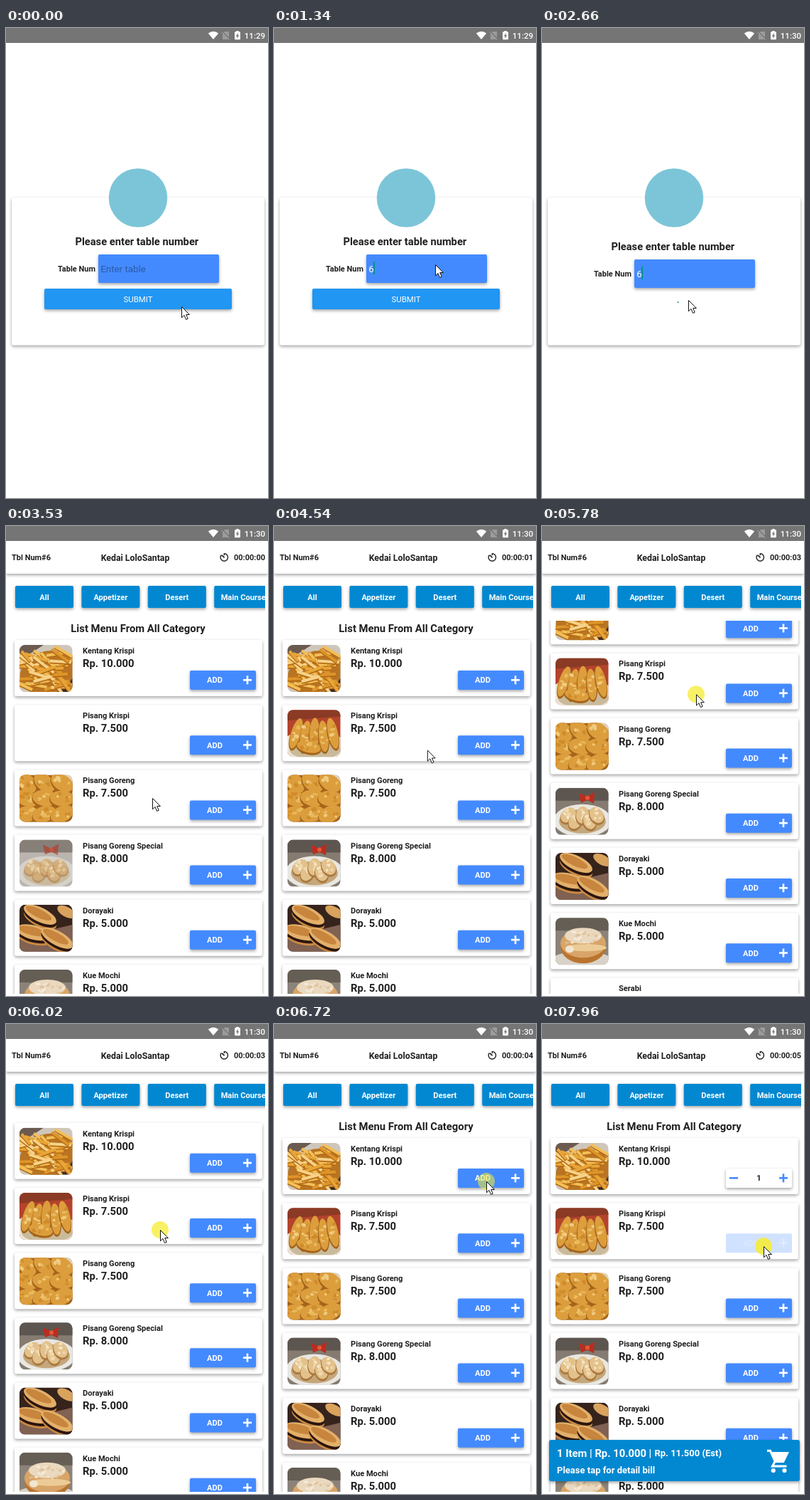
Recreate the animation shown at these times as an HTML page with a canvas. Size 369 px wide and 660 px high, loop 8000 ms.

```html
<!DOCTYPE html>
<html lang="id">
<head>
<meta charset="utf-8">
<title>Table order</title>
<style>
  html, body { margin: 0; width: 100%; height: 100%; overflow: hidden; background: #fff; }
  canvas { display: block; width: 369px; height: 660px; }
</style>
</head>
<body>
<canvas id="stage"></canvas>
<script>
const W = 369, H = 660, LOOP = 8000;
const INK = '#1f1f1f', BLUE = '#448aff', DEEP = '#0288d1', TEAL = '#009688';
const canvas = document.getElementById('stage');
const c = canvas.getContext('2d');
const dpr = window.devicePixelRatio || 1;
canvas.width = W * dpr;
canvas.height = H * dpr;

const clamp = v => Math.max(0, Math.min(1, v));
const ramp = (t, from, span) => clamp((t - from) / span);
const ease = p => p * p * (3 - 2 * p);

// Interpolates rows of [time, ...values].
function follow(keys, t) {
  let i = 0;
  while (i < keys.length - 1 && t >= keys[i + 1][0]) i++;
  const a = keys[i], b = keys[Math.min(i + 1, keys.length - 1)];
  const p = a === b ? 0 : clamp((t - a[0]) / (b[0] - a[0]));
  return a.slice(1).map((v, k) => v + (b[k + 1] - v) * p);
}

const POINTER = [
  [0, 247, 391], [70, 247, 391], [250, 227, 332], [1570, 227, 332], [2040, 206, 382],
  [3990, 206, 382], [4610, 217, 306], [4780, 217, 306], [5330, 217, 253],
  [5600, 217, 224], [5640, 217, 224], [5780, 217, 236], [6080, 217, 302],
  [6420, 286, 234], [6570, 299, 221], [7100, 299, 221], [7640, 312, 312]
];
const SCROLL = [[4780, 0], [4860, 2], [5330, 35], [5580, 80], [5650, 82], [5780, 73], [6120, 0]];
const PRESSES = [
  [420, 570, .75], [2120, 2280, .75], [4780, 6090, .75], [6720, 6870, .55], [7960, 8000, .88]
];
const TICKS = [3660, 4610, 5640, 6720, 7730];

const ITEMS = [
  ['Kentang Krispi', '10.000', 3210],
  ['Pisang Krispi', '7.500', 4000],
  ['Pisang Goreng', '7.500', 3260],
  ['Pisang Goreng Special', '8.000', 3420],
  ['Dorayaki', '5.000', 3210],
  ['Kue Mochi', '5.000', 3240],
  ['Serabi', '5.000', 9000]
];

function text(str, x, y, size, color = INK, align = 'left', weight = 700) {
  c.font = `${weight} ${size}px Roboto, sans-serif`;
  c.textAlign = align;
  c.fillStyle = color;
  c.fillText(str, x, y + size * .355);
}

function box(x, y, w, h, color, r = 0, shadow = false) {
  c.save();
  if (shadow) {
    c.shadowColor = 'rgba(0,0,0,.36)';
    c.shadowBlur = 4 * dpr;
    c.shadowOffsetY = 2 * dpr;
  }
  c.fillStyle = color;
  c.beginPath();
  c.roundRect(x, y, w, h, r);
  c.fill();
  c.restore();
}

function oval(x, y, rx, ry, color, turn = 0) {
  c.fillStyle = color;
  c.beginPath();
  c.ellipse(x, y, rx, ry, turn, 0, Math.PI * 2);
  c.fill();
}

function line(points, color, width) {
  c.strokeStyle = color;
  c.lineWidth = width;
  c.beginPath();
  points.forEach(([x, y]) => c.lineTo(x, y));
  c.stroke();
}

function shape(points, color) {
  c.fillStyle = color;
  c.beginPath();
  points.forEach(([x, y]) => c.lineTo(x, y));
  c.closePath();
  c.fill();
}

// Food pictures, each 74.5 by 66.
let seed = 1;
const rand = (lo = 0, hi = 1) =>
  lo + (hi - lo) * ((seed = seed * 16807 % 2147483647) / 2147483647);
const pick = list => list[Math.floor(rand() * list.length)];

function fritter(x, y, rx, ry, turn, tones) {
  oval(x, y + 2, rx, ry, tones[0], turn);
  oval(x, y, rx - 1, ry - 1, tones[1], turn);
  for (let i = 0; i < 8; i++) {
    oval(x + rand(-.55, .55) * rx, y + rand(-.6, .4) * ry, rand(1.5, 4), rand(1, 3), pick(tones.slice(1)), turn);
  }
}

const GOLD = ['#a4641a', '#dc9e3c', '#e9b95d', '#cf8b2c', '#f0cb80'];
const PHOTOS = [
  () => {
    box(0, 0, 75, 66, '#cfc6bb');
    shape([[0, 0], [34, 0], [0, 22]], '#6b5a50');
    shape([[48, 66], [75, 46], [75, 66]], '#3d2b26');
    oval(39, 39, 39, 30, '#b87422', -.3);
    for (let i = 0; i < 46; i++) {
      const x = rand(5, 68), y = rand(9, 60), a = rand(-.5, 1), n = rand(9, 19);
      const dx = Math.cos(a) * n, dy = Math.sin(a) * n;
      line([[x - dx, y - dy + 1.5], [x + dx, y + dy + 1.5]], '#b56c16', 4.5);
      line([[x - dx, y - dy], [x + dx, y + dy]], pick(['#e8a537', '#f2bf58', '#dd952a', '#f6d288']), 4);
    }
  },
  () => {
    box(0, 0, 75, 66, '#b5432c');
    shape([[0, 0], [75, 0], [75, 9], [0, 15]], '#8a3a25');
    oval(36, 52, 46, 24, '#ece4d5');
    oval(39, 56, 36, 14, '#c9ba9b');
    for (let i = 0; i < 5; i++) fritter(12 + i * 13, 33 + i % 2 * 4, 8, 23, .3 - i * .13, GOLD);
    fritter(30, 52, 18, 9, .2, GOLD);
  },
  () => {
    box(0, 0, 75, 66, '#a8651e');
    shape([[50, 0], [75, 0], [75, 16]], '#dfd3bd');
    for (let i = 0; i < 9; i++) fritter(10 + i % 3 * 25, 11 + Math.floor(i / 3) * 22, 18, 12, .9 - i * .17, GOLD);
  },
  () => {
    box(0, 0, 75, 66, '#857b70');
    box(0, 0, 75, 18, '#5d5650');
    oval(38, 46, 41, 23, '#e9e7e2');
    oval(38, 47, 33, 17, '#c4a77b');
    const cream = ['#ab7840', '#e3c18a', '#efd8ae', '#f5e8ce'];
    for (let i = 0; i < 5; i++) fritter(18 + i * 10, 38 + i % 2 * 8, 10, 13, .8 - i * .35, cream);
    shape([[33, 7], [44, 12], [55, 6], [54, 22], [45, 17], [36, 21]], '#b92d20');
    oval(45, 14, 3, 3, '#e25a36');
  },
  () => {
    box(0, 0, 75, 66, '#35231c');
    shape([[0, 46], [75, 28], [75, 66], [0, 66]], '#806152');
    [[29, 14, .45], [20, 39, .25], [53, 47, .5]].forEach(([x, y, a]) => {
      oval(x, y + 7, 25, 10, '#c98a43', a);
      oval(x, y + 4, 25, 10, '#2b1510', a);
      oval(x, y, 25, 10, '#e3b06a', a);
      oval(x - 2, y - 2, 20, 6, '#c7853d', a);
    });
    oval(66, 10, 14, 7, '#d9a35d', .5);
  },
  () => {
    box(0, 0, 75, 66, '#8b8379');
    box(0, 0, 75, 18, '#655e54');
    oval(37, 60, 43, 13, '#d8d2c8');
    oval(39, 40, 32, 24, '#b9742f');
    oval(39, 36, 32, 20, '#d9a467');
    oval(39, 25, 26, 11, '#ead9bf');
    oval(43, 42, 29, 5, '#eccb96');
    oval(20, 44, 6, 5, '#f0e5d1');
    for (let i = 0; i < 26; i++) oval(rand(15, 63), rand(17, 37), rand(.8, 3), rand(.6, 2), pick(['#f4eadb', '#dfc49d']));
  }
];

function photo(i, x, y, alpha) {
  if (!PHOTOS[i] || alpha <= 0) return;
  c.save();
  c.globalAlpha = alpha;
  c.translate(x, y);
  c.beginPath();
  c.roundRect(0, 0, 74.5, 66, 8);
  c.clip();
  seed = 97 + i * 131;
  PHOTOS[i]();
  c.restore();
}

function statusBar(t) {
  box(0, 0, W, 21, '#757575');
  c.fillStyle = '#fff';
  c.beginPath();
  c.moveTo(292, 16);
  c.lineTo(284.8, 7.4);
  c.quadraticCurveTo(292, 2.2, 299.2, 7.4);
  c.fill();
  shape([[308, 5], [314, 5], [314, 16], [305, 16], [305, 8]], '#9b9b9b');
  line([[304, 5], [315, 16]], '#757575', 2);
  line([[303.5, 5.5], [314.5, 16.5]], '#a8a8a8', 1);
  box(322, 5.3, 8, 11, '#fff', 1);
  box(324.3, 4, 3.4, 2, '#fff');
  shape([[326.8, 6.7], [323.8, 11.4], [325.6, 11.4], [325.2, 15], [328.3, 10.2], [326.5, 10.2]], '#757575');
  text(t < 1800 ? '11:29' : '11:30', 365, 11, 11.5, '#fff', 'right', 500);
}

function formPage(t) {
  const busy = t >= 2430, dy = busy ? 7 : 0;
  box(8, 238, 356, 207.5, '#fff', 3, true);
  oval(186, 238.5, 41.3, 41.3, '#7cc5d8');
  text('Please enter table number', 184.3, 299.5 + dy, 14.7, INK, 'center');
  text('Table Num', 126, 338 + dy, 11, INK, 'right');
  box(130, 318 + dy, 170, 40, BLUE, 2, true);

  const typed = t >= 1340;
  if (typed) text('6', 133.3, 338 + dy, 13.3, '#fff', 'left', 400);
  else text('Enter table', 133.3, 338, 13.3, '#2a5aa6', 'left', 400);
  if (typed || (t >= 490 && t < 1030)) box(typed ? 140 : 133, 328 + dy, 2, 18, TEAL);

  if (busy) {
    const a = -.75 + (t - 2660) / 420;
    c.strokeStyle = TEAL;
    c.lineWidth = 1.6;
    c.beginPath();
    c.arc(186, 389, 7, a, a + .28);
    c.stroke();
    return;
  }
  box(54, 366, 264, 29, '#2196f3', 2, true);
  if (t >= 2120) {
    c.save();
    c.beginPath();
    c.rect(54, 366, 264, 29);
    c.clip();
    const r = 160 * ease(ramp(t, 2100, 230));
    oval(206, 382, r, r, 'rgba(255,255,255,.18)');
    c.restore();
  }
  text('SUBMIT', 186, 381, 11.4, '#fff', 'center', 400);
}

function plus(x, y, color) {
  line([[x - 6, y], [x + 6, y]], color, 2.6);
  line([[x, y - 6], [x, y + 6]], color, 2.6);
}

function addButton(y, alpha) {
  c.save();
  c.globalAlpha = alpha;
  box(259, y, 93, 27, BLUE, 2, alpha === 1);
  text('ADD', 294, y + 13.5, 11.1, '#fff', 'center');
  plus(340, y + 13.3, '#fff');
  c.restore();
}

function stepper(y) {
  box(259, y, 93, 27, '#fff', 2, true);
  line([[264, y + 13.3], [276, y + 13.3]], BLUE, 2.6);
  text('1', 305.5, y + 13.5, 11.1, INK, 'center');
  plus(340, y + 13.3, BLUE);
}

function menuList(t) {
  const [scroll] = follow(SCROLL, t);
  c.save();
  c.beginPath();
  c.rect(0, 133, W, 524);
  c.clip();
  c.translate(0, -scroll);
  text('List Menu From All Category', 186, 144, 14.8, INK, 'center');
  ITEMS.forEach(([name, price, loadAt], i) => {
    const y = 160 + i * 91.2;
    box(12, y, 349, 79, '#fff', 3, true);
    photo(i, 19, y + 7, ramp(t, loadAt, 200));
    text(name, 108, y + 15, 11.1);
    text('Rp. ' + price, 108, y + 32.7, 14.8);
    if (i === 0 && t >= 7100) stepper(y + 43);
    else {
      const faded = (i === 0 && t >= 6790) || (i === 1 && t >= 7950);
      addButton(y + 43, faded ? .25 : 1);
    }
  });
  c.restore();
}

function header(t) {
  box(0, 21, W, 46, '#fff', 2, true);
  box(0, 0, W, 21, '#757575');
  text('Tbl Num#6', 8, 44.5, 11);
  text('Kedai LoloSantap', 182, 44.5, 12.3, INK, 'center');
  c.strokeStyle = INK;
  c.lineWidth = 1.4;
  c.beginPath();
  c.arc(307.3, 44, 5.2, -Math.PI / 2, Math.PI * 1.22);
  c.stroke();
  line([[307.3, 38.3], [307.3, 41.2]], INK, 1.4);
  line([[303.8, 40.8], [307.6, 44.4]], INK, 1.6);
  const secs = TICKS.filter(k => t >= k).length;
  text('00:00:0' + secs, 365, 44.5, 11, INK, 'right');

  c.save();
  c.beginPath();
  c.rect(0, 76, 365, 50);
  c.clip();
  ['All', 'Appetizer', 'Desert', 'Main Course'].forEach((label, i) => {
    const x = 13 + i * 93.4;
    box(x, 84, 82, 31, DEEP, 2, true);
    text(label, x + 41, 100, 11.1, '#fff', 'center');
  });
  c.restore();
}

function billBar(t) {
  const p = ease(ramp(t, 7260, 360));
  if (!p) return;
  c.save();
  c.translate(0, 76 * (1 - p));
  box(10, 584, 353, 58, DEEP, 3, true);
  text('1 Item | Rp. 10.000 | ', 21, 602.7, 14.8, '#fff');
  text('Rp. 11.500 (Est)', 158.5, 602.7, 13, '#fff');
  text('Please tap for detail bill', 21, 626.5, 13, '#fff');
  line([[317, 599.3], [321.5, 599.3], [328.5, 614.5], [341, 614.5]], '#fff', 3);
  shape([[322, 601], [348, 601], [340.8, 615.8], [328, 615.8]], '#fff');
  line([[328, 614.5], [324.5, 621], [344.5, 621]], '#fff', 3);
  oval(325.8, 627, 3.1, 3.1, '#fff');
  oval(341.5, 627, 3.1, 3.1, '#fff');
  c.restore();
}

function pointer(t) {
  const [x, y] = follow(POINTER, t);
  const press = PRESSES.find(([from, to]) => t >= from && t < to);
  if (press) oval(x, y, 12, 12, `rgba(246,236,50,${press[2]})`);
  c.save();
  c.translate(x, y);
  c.beginPath();
  [[.5, .5], [.5, 15.8], [4, 12.4], [6.5, 18.4], [9.2, 17.2], [6.7, 11.5], [11.4, 11.5]]
    .forEach(([px, py]) => c.lineTo(px, py));
  c.closePath();
  c.fillStyle = '#fff';
  c.fill();
  c.strokeStyle = '#111';
  c.lineWidth = 1;
  c.stroke();
  c.restore();
}

function draw(t) {
  c.setTransform(dpr, 0, 0, dpr, 0, 0);
  box(0, 0, W, H, '#fff');
  if (t < 2740) formPage(t);
  else {
    menuList(t);
    header(t);
    billBar(t);
  }
  statusBar(t);
  pointer(t);
}

const start = performance.now();
function tick() {
  draw((performance.now() - start) % LOOP);
  requestAnimationFrame(tick);
}
tick();
</script>
</body>
</html>
```
